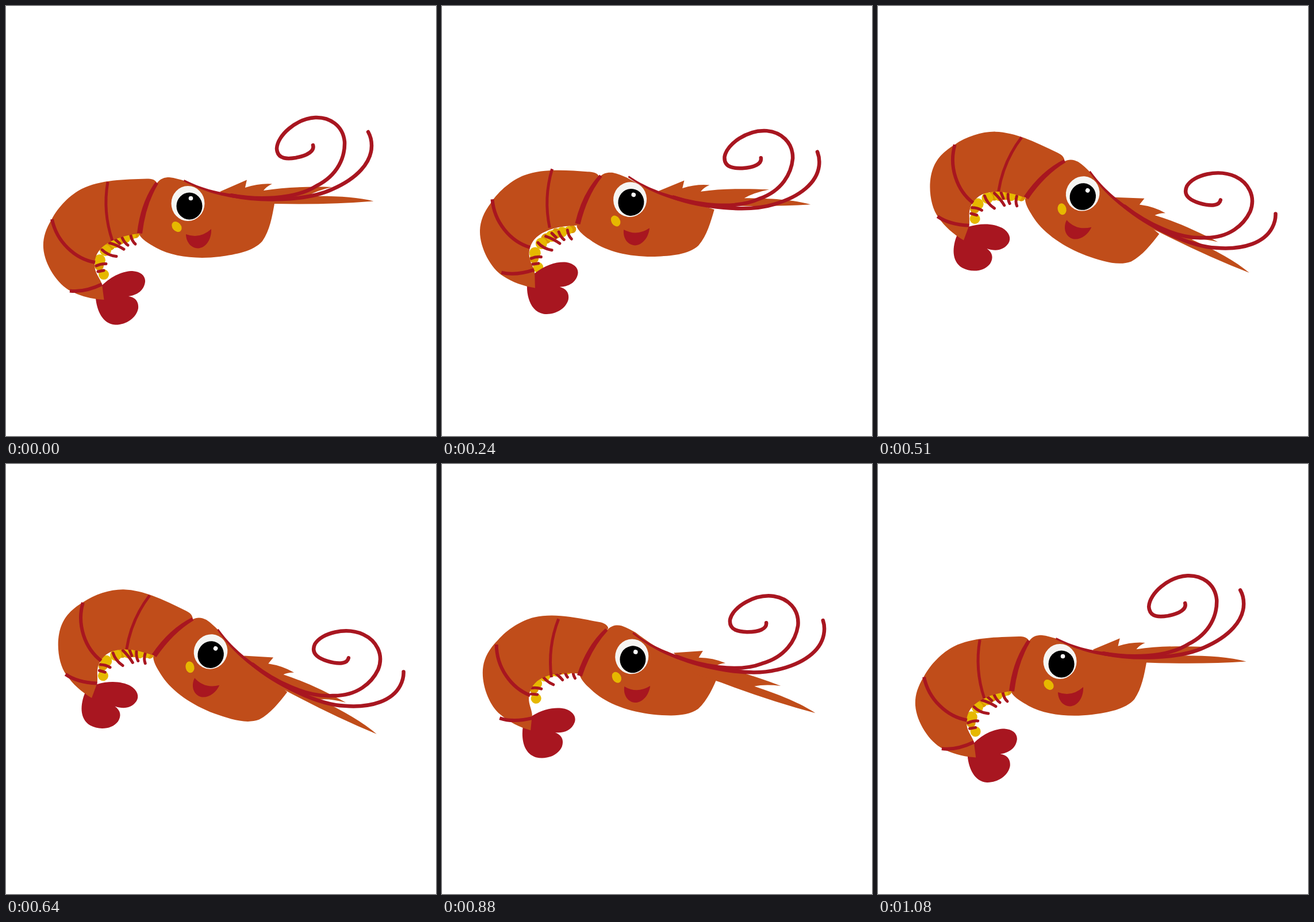
An HTML page for the animation above (1110 ms loop, 748 px wide and 748 px high).

```html
<!DOCTYPE html>
<html lang="en">
<head>
<meta charset="utf-8">
<title>Shrimp</title>
<style>
  html, body { margin: 0; width: 100%; height: 100%; overflow: hidden; background: #fff; }
  svg { display: block; width: 100%; height: 100%; }
  .orange { fill: #c04d1a; }
  .red { fill: #a81620; }
  .yellow { fill: #e6b800; }
  .amber { fill: #dc9800; }
  .line { fill: none; stroke: #a81620; }
  .round { stroke-linecap: round; stroke-linejoin: round; }
</style>
</head>
<body>
<svg viewBox="0 0 748 748">
  <!-- data-lag: how many ms a layer trails the antennae -->
  <g data-lag="44">
    <g class="amber">
      <circle cx="225" cy="397" r="7"/>
      <circle cx="198" cy="406" r="9"/>
      <circle cx="181" cy="416" r="9"/>
      <circle cx="162" cy="452" r="8"/>
    </g>
    <g class="yellow">
      <circle cx="219" cy="399" r="7"/>
      <circle cx="208" cy="403" r="9"/>
      <circle cx="190" cy="411" r="10"/>
      <circle cx="173" cy="425" r="10"/>
      <circle cx="163" cy="442" r="10"/>
      <circle cx="170" cy="467" r="9"/>
    </g>
    <path class="line round" stroke-width="5" d="M180 412Q194 416 205 423M167 424Q177 434 192 435.500M157 452Q165 448 174 448.500M160 462L170 460M202 403Q206 412 212 416M217 399Q219 409 225 414M190 406L198 413"/>
  </g>

  <g data-lag="16">
    <path class="red" d="M166 487C185 468 205 461 220 461C235 462 243 470 242 480C240 495 228 503 213 505C226 507 231 515 230 526C227 543 208 555 190 554.500C168 553 158 530 156 508Z"/>
    <path class="orange" d="M262 307C258 301 252 300.500 245 300.500C205 302 165 302 132 318C112 328 91 349 79.500 371C68 390 64 405 65 421C67 450 90 485 113 496C130 505 150 510 170.500 511L167 484C163 472 154 465 154 449C155 430 165 418 185 408C200 401 215 398 235 395Z"/>
    <path class="orange" d="M262 309C268 300 276 298 284 298C294 299 303 302 310 304C330 313 350 322 373 324L467 344C463 366 459 390 446 409C430 427 400 432 372 436C330 441 290 436 262 421C250 414 238 408 232 398C232 370 245 330 262 309Z"/>
  </g>

  <g data-lag="4" class="line">
    <path stroke-width="5" d="M177 306Q168 358 185 408"/>
    <path stroke-width="6" d="M80 371C88 410 120 440 155 446M111 495.500C130 498 150 492 167 484"/>
    <path class="red" stroke="none" d="M260 306L265 309Q243 345 237 396L228 395Q234 342 260 306Z"/>
  </g>

  <g data-lag="76">
    <path class="orange" d="M372 323L419 302.500L416 316Q440 308 463 309.500Q453 314 448 321C485 315 525 314 567 315Q540 321 524 331C570 330 610 332 639.500 339.500Q560 346 467 344L420 345Z"/>
  </g>

  <g data-lag="-6">
    <ellipse cx="316.500" cy="343.500" rx="29" ry="30.500" fill="#f6f5f2"/>
    <ellipse cx="319" cy="348" rx="22.500" ry="23.500"/>
    <circle cx="321.500" cy="334.500" r="3.800" fill="#fff"/>
    <ellipse class="yellow" cx="297" cy="384" rx="7.500" ry="10" transform="rotate(-40 297 384)"/>
    <path class="red" d="M313 397Q337 406 357 388C358 405 348 421 334 421.500C320 421 313 408 313 397Z"/>
  </g>

  <g data-lag="0">
    <path class="red" d="M310 302C332 313 358 323 402 328L402 334.500C362 329 335 318 309 305Z"/>
    <g class="line round">
      <path stroke-width="6.500" d="M392 329.500C435 337 500 338 540 313C578 294 590 262 589 236C586 207 562 193 538 194C505 196 472 225 471 248C472 268 492 266 504 264C525 260 537 252 534 242"/>
      <path stroke-width="6.500" d="M392 329.500C440 340 522 340 567 319C611 300 636 272 636 243C636 232 634 226 630 219"/>
    </g>
  </g>
</svg>
<script>
  const LOOP = 1110, RISE = 578, HOLD = 30, FALL = LOOP - RISE - HOLD;
  const TILT = 27.7, PIVOT = "371 415.5";
  const layers = [...document.querySelectorAll("[data-lag]")];

  const easeInOut = (u, power) =>
    u < 0.5 ? (2 * u) ** power / 2 : 1 - (2 - 2 * u) ** power / 2;

  // 0 = head raised, 1 = head lowered
  function swing(time) {
    const t = ((time % LOOP) + LOOP) % LOOP;
    if (t < RISE) return easeInOut(t / RISE, 3.5);
    if (t < RISE + HOLD) return 1;
    return 1 - easeInOut((t - RISE - HOLD) / FALL, 2.5);
  }

  function draw(now) {
    for (const layer of layers) {
      const lag = +layer.dataset.lag;
      const angle = TILT * (swing(now - lag) - swing(-lag));
      layer.setAttribute("transform", `rotate(${angle} ${PIVOT})`);
    }
  }

  const start = performance.now();
  function tick() {
    draw(performance.now() - start);
    requestAnimationFrame(tick);
  }
  tick();
</script>
</body>
</html>
```
